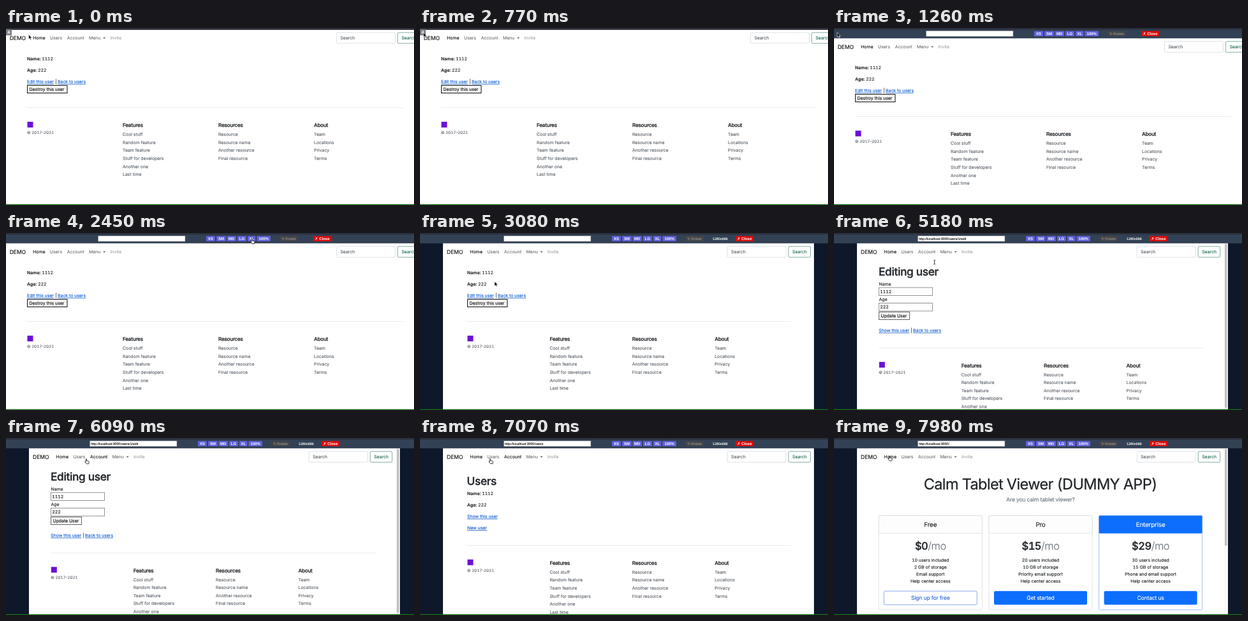
These frames come from a looping animation (640x279 px, 8 s). An HTML page:

```html
<!DOCTYPE html>
<html lang="en">
<head>
<meta charset="utf-8">
<title>Demo app</title>
<style>
html, body { margin: 0; width: 100%; height: 100%; overflow: hidden; background: #fff; }
svg { display: block; width: 640px; height: 279px; }
/* The thin stroke gives small text the weight of smoothed screen type. */
text {
  font: 6.9px Inter, sans-serif; font-optical-sizing: none; font-variant-numeric: tabular-nums;
  text-rendering: geometricPrecision; white-space: pre;
  color: #212529; fill: currentColor; stroke: currentColor; stroke-width: .15px;
}
.brand { font-size: 8.5px; color: #111; }
.nav { color: #777; }
.on { color: #151515; }
.off { color: #aaa; }
.muted { color: #5f666d; }
.small { font-size: 6.15px; color: #5f666d; }
.link { color: #0d5bd0; text-decoration: underline; }
.h5 { font-size: 8.2px; font-weight: 500; letter-spacing: -.28px; stroke-width: .22px; }
.h1 { font-size: 17.3px; font-weight: 500; letter-spacing: -.35px; stroke-width: .35px; }
.hero { font-size: 23.6px; letter-spacing: -.65px; stroke-width: .25px; }
.lead { font-size: 8.6px; letter-spacing: -.15px; color: #6c757d; }
.card { font-size: 10px; letter-spacing: -.25px; }
.price { font-size: 16.5px; font-weight: 500; letter-spacing: -.5px; stroke-width: .35px; }
.price tspan { font-weight: 300; color: #6c757d; stroke-width: .1px; }
.price tspan { fill: currentColor; stroke: currentColor; }
.big { font-size: 8.6px; letter-spacing: -.15px; }
.white { color: #fff; }
.blue { color: #2f66d6; }
.green { color: #24705c; }
.mid { text-anchor: middle; }
.url { font: 5.15px "Liberation Sans", sans-serif; color: #000; stroke-width: .1px; }
.size { font: 5.4px "Liberation Sans", sans-serif; color: #fff; }
.tool { font: bold 6px "Liberation Sans", "DejaVu Sans", sans-serif; color: #fff; text-anchor: middle; stroke: none; }
.dim { font-weight: normal; font-size: 5.6px; color: #a3a3a3; }
</style>
</head>
<body>
<svg viewBox="0 0 640 279"><g id="stage"></g><g id="cursor"></g></svg>
<script>
const LOOP = 8000;

// [start, page, full width, toolbar, address]
const states = [
  [0, 'show', true, false, ''],
  [910, 'show', true, true, ''],
  [2590, 'show', false, true, ''],
  [4060, 'edit', false, true, 'http://localhost:3000/users/1/edit'],
  [6440, 'users', false, true, 'http://localhost:3000/users'],
  [7800, 'home', false, true, 'http://localhost:3000/']
];

// [time, x, y]
const path = [
  [0, 35.5, 10.5], [350, 35.5, 10.5], [800, 5, 7], [1650, 5, 7], [2380, 385, 9],
  [2640, 385, 9], [3020, 117, 76.5], [3430, 117, 76.5], [3800, 106, 96.5], [4400, 106, 96.5],
  [5050, 157.6, 46], [5350, 157.6, 46], [5700, 146, 33], [5900, 146, 33],
  [6250, 109.5, 32.5], [7150, 109.5, 32.5], [7560, 86.2, 28], [LOOP, 86.2, 28]
];

// [start, shape]
const shapes = [
  [0, 'arrow'], [2300, 'hand'], [2680, 'arrow'], [3640, 'hand'], [4500, 'arrow'],
  [4850, 'beam'], [5550, 'hand']
];

const cursors = {
  arrow: '<path d="M0 0V7.2L1.7 5.7 2.8 8.3 4 7.8 2.9 5.2H5.2Z" fill="#000" stroke="#fff" stroke-width=".6"/>',
  hand: '<path d="M0 .6Q.7-.4 1.3.6V3.2L4.4 3.8Q5.2 4 5.1 5L4.5 8H1.1L-1.4 5Q-1.6 4-.7 4.2L0 4.8Z" fill="#fff" stroke="#111" stroke-width=".8"/>',
  beam: '<path d="M-1.5-3.3Q0-3.3 0-2.3Q0-3.3 1.5-3.3M0-2.3V2.3M-1.5 3.3Q0 3.3 0 2.3Q0 3.3 1.5 3.3" fill="none" stroke="#111" stroke-width=".8"/>'
};

const text = (x, mid, s, cls = '', rise = 2.5) =>
  `<text x="${x}" y="${mid + rise}" class="${cls}">${s}</text>`;
const rect = (x, y, w, h, fill, stroke = 'none', rx = 0, sw = .7) =>
  `<rect x="${x}" y="${y}" width="${w}" height="${h}" fill="${fill}" stroke="${stroke}" rx="${rx}" stroke-width="${sw}"/>`;
const bold = (label, value) => `<tspan font-weight="600">${label}:</tspan> ${value}`;

function links(x, y, first, gap, second) {
  return text(x, y, first, 'link') + text(x + gap - 3.5, y, '|') + text(x + gap, y, second, 'link');
}

function button(x, y, w, label, edge) {
  return rect(x + .5, y + .5, w - 1, 12, '#f6f6f6', edge, 0, 1) + text(x + 3.5, y + 6.5, label, 'on');
}

function field(x, y, value) {
  return rect(x + .5, y + .5, 84, 12.5, '#fff', '#777', 0, .8) + text(x + 2.3, y + 6.8, value, 'on');
}

function navbar(x, y, right, hover) {
  const mid = y + 15.8;
  return text(x + 5.7, mid, 'DEMO', 'brand', 3.1) +
    text(x + 42.2, mid, 'Home', 'on') +
    text(x + 69, mid, 'Users', 'nav') +
    text(x + 95.7, mid, 'Account', hover ? 'on' : 'nav') +
    text(x + 130, mid, 'Menu', 'nav') +
    `<path d="M${x + 152} ${mid - 1}h4.4l-2.2 2.2z" fill="#666"/>` +
    text(x + 163.5, mid, 'Invite', 'off') +
    rect(right, y + 7.2, 92, 17, '#fff', '#ced4da', 1.8) +
    text(right + 6, mid, 'Search', 'muted') +
    rect(right + 96, y + 7.2, 34.5, 17, '#fff', '#4c8b79', 1.8) +
    text(right + 102, mid, 'Search', 'green');
}

function footer(x, y, step) {
  const columns = [
    ['Features', 'Cool stuff', 'Random feature', 'Team feature', 'Stuff for developers', 'Another one', 'Last time'],
    ['Resources', 'Resource', 'Resource name', 'Another resource', 'Final resource'],
    ['About', 'Team', 'Locations', 'Privacy', 'Terms']
  ];
  return rect(x, y, step * 3.93, .6, '#dcdee0') +
    rect(x + .5, y + 22.5, 9, 9, '#6b10d8') +
    text(x, y + 39.5, '© 2017–2021', 'small', 2.2) +
    columns.map(([title, ...items], i) => {
      const cx = x + step * (i + 1);
      return text(cx, y + 28, title, 'h5', 3) +
        items.map((s, j) => text(cx, y + 42.3 + j * 12.65, s, 'muted')).join('');
    }).join('');
}

function scrollbar(length) {
  return rect(611.5, 16, 6.5, 262, '#fafafa') + rect(613, 17, 3.6, length, '#c1c1c1', 'none', 1.8);
}

function priceCard(x, title, price, items, label) {
  const top = title === 'Enterprise', plain = title === 'Free';
  const edge = top ? '#7aa5ee' : '#d5d7d9', cx = x + 81;
  return rect(x, 122.3, 162, 148.5, '#fff', edge, 2) +
    rect(x, 122.3, 162, 28, top ? '#0d6efd' : '#fdfdfd', edge, 1.5) +
    text(cx, 136.5, title, 'card mid' + (top ? ' white' : ''), 3.6) +
    text(cx, 170, `$${price}<tspan>/mo</tspan>`, 'price mid', 6) +
    items.map((s, i) => text(cx, 192.5 + i * 11, s, 'mid')).join('') +
    rect(x + 8, 241.3, 146, 21.5, plain ? '#fff' : '#0d6efd', plain ? '#5b87dc' : 'none', 2) +
    text(cx, 252.2, label, 'big mid ' + (plain ? 'blue' : 'white'), 3.1);
}

const pages = {
  show(full, y) {
    const x = full ? 33 : 74;
    return text(x, y + 48.5, bold('Name', '1112')) +
      text(x, y + 66.5, bold('Age', '222')) +
      links(x, y + 84.7, 'Edit this user', 48, 'Back to users') +
      button(x, y + 90, 63.5, 'Destroy this user', '#111') +
      footer(x, y + 125.3, full ? 150 : 129.4);
  },
  edit() {
    return text(70, 61, 'Editing user', 'h1', 6.2) +
      text(70.5, 80.2, 'Name') + field(70, 85.5, '1112') +
      text(70.5, 104.7, 'Age') + field(70, 110, '222') +
      button(70, 124, 49, 'Update User', '#666') +
      links(70.3, 153.6, 'Show this user', 53.7, 'Back to users') +
      footer(70.3, 180.7, 129.4) + scrollbar(259);
  },
  users() {
    return text(73.5, 68, 'Users', 'h1', 6.2) +
      text(74, 87.5, bold('Name', '1112')) +
      text(74, 105.5, bold('Age', '222')) +
      text(74, 123.8, 'Show this user', 'link') +
      text(74, 141.8, 'New user', 'link') +
      footer(74, 169, 129.4);
  },
  home() {
    const plan = (users, size, support) =>
      [users + ' users included', size + ' GB of storage', support + ' support', 'Help center access'];
    return text(323.7, 72.5, 'Calm Tablet Viewer (DUMMY APP)', 'hero mid', 8.7) +
      text(324, 97.2, 'Are you calm tablet viewer?', 'lead mid', 3) +
      priceCard(70.3, 'Free', 0, plan(10, 2, 'Email'), 'Sign up for free') +
      priceCard(243, 'Pro', 15, plan(20, 10, 'Priority email'), 'Get started') +
      priceCard(415.6, 'Enterprise', 29, plan(30, 15, 'Phone and email'), 'Contact us') +
      scrollbar(153);
  }
};

function toolbar(full, url) {
  const x = full ? 144.5 : 131.5, close = full ? 482 : 495;
  const sizes = [['XS', 169.5, 14], ['SM', 185.5, 15], ['MD', 202, 14.5], ['LG', 218.5, 14], ['XL', 234.5, 12.5], ['100%', 249, 21.5]];
  const chip = (left, w, fill) => rect(left, 4.8, w, 8.2, fill, 'none', 1);
  return rect(0, 0, 640, 16.3, '#334155') + rect(0, 0, 640, 2.5, '#2b303c') +
    rect(x, 4.5, 136.5, 8.7, '#fff', '#777', 0, .5) +
    text(x + 1.7, 8.8, url, 'url', 1.9) +
    sizes.map(([s, dx, w]) => chip(x + dx, w, '#6260dc') + text(x + dx + w / 2, 8.8, s, 'tool', 2.1)).join('') +
    chip(x + 284.5, 29, '#454547') +
    text(x + 299, 8.8, '↻ Rotate', 'tool dim', 2) +
    (full ? '' : text(459, 8.8, '1280x686', 'size', 2)) +
    chip(close, 28, '#dc0b0b') +
    text(close + 14, 8.8, '✗ Close', 'tool', 2.1);
}

function draw([, page, full, bar, url], hover) {
  const x = full ? 0 : 36.4, y = bar ? 14 : 0;
  const right = full ? 518.4 : page === 'edit' || page === 'home' ? 475.2 : 482;
  const top = bar ? toolbar(full, url)
    : rect(0, 0, 640, 3, '#30333d') + rect(0, 2, 9, 9.5, '#777b82') +
      '<path d="M2.5 8.5L4.5 6.5L6.5 8.5M2.5 5H6.5" fill="none" stroke="#fff" stroke-width="1.2"/>';
  const sides = full ? '' : rect(0, 16, 36, 262, '#0f172a') + rect(618, 16, 22, 262, '#0f172a');
  return rect(0, 0, 640, 279, '#fff') + navbar(x, y, right, hover) + pages[page](full, y) +
    sides + top + rect(0, 277.7, 640, 1.3, '#187018');
}

const latest = (list, t) => list.findLast(item => item[0] <= t);

function position(t) {
  const i = path.findIndex(p => p[0] > t);
  const [t0, x0, y0] = path[i - 1], [t1, x1, y1] = path[i];
  const u = (t - t0) / (t1 - t0), e = u * u * (3 - 2 * u);
  return [x0 + (x1 - x0) * e, y0 + (y1 - y0) * e];
}

const stage = document.getElementById('stage');
const cursor = document.getElementById('cursor');
let shown, shape;

function render(now) {
  const t = now % LOOP;
  const state = latest(states, t);
  const hover = t >= 5600 && state[1] !== 'home';
  const key = state[0] + '/' + hover;
  if (key !== shown) {
    stage.innerHTML = draw(state, hover);
    shown = key;
  }
  const kind = latest(shapes, t)[1];
  if (kind !== shape) {
    cursor.innerHTML = cursors[kind];
    shape = kind;
  }
  cursor.setAttribute('transform', `translate(${position(t)})`);
  requestAnimationFrame(render);
}
render(0);
</script>
</body>
</html>
```
